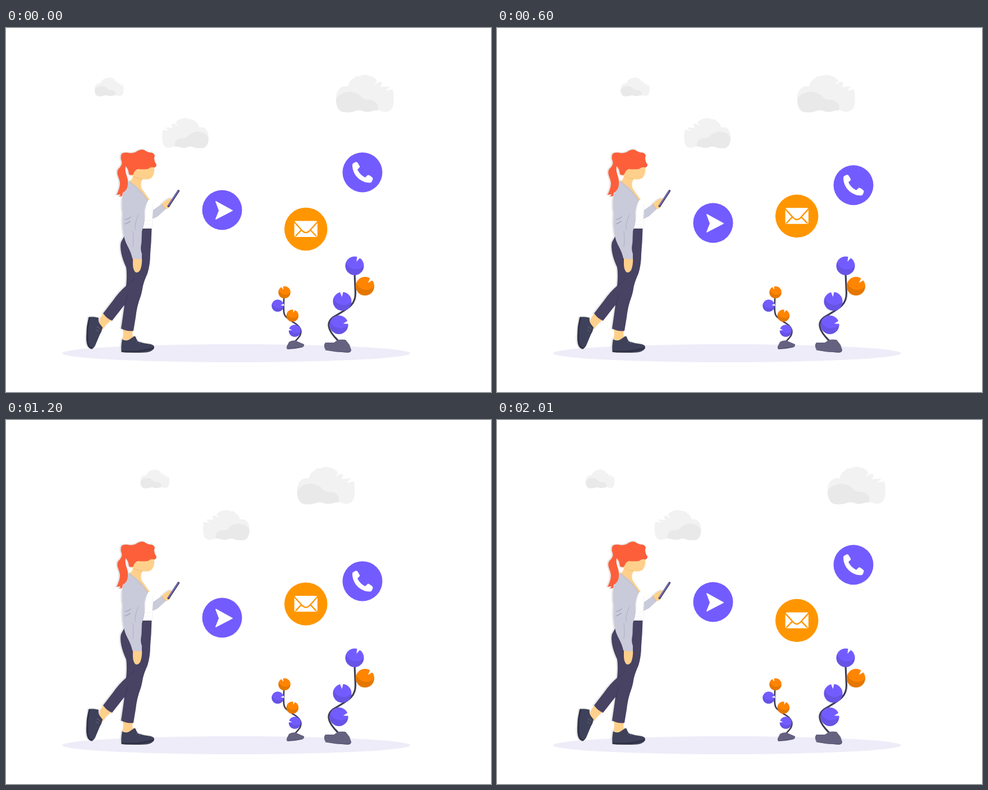
Animation of 864 by 648 pixels, one loop 2040 ms. Source, as an HTML page with a canvas:

```html
<!DOCTYPE html>
<html lang="en">
<head>
<meta charset="utf-8">
<title>Walking with a phone</title>
<style>
html, body { margin: 0; width: 100%; height: 100%; overflow: hidden; background: #fff; }
canvas { display: block; }
</style>
</head>
<body>
<canvas id="stage" width="864" height="648"></canvas>
<script>
const ctx = document.getElementById('stage').getContext('2d');
const LOOP = 2040, TURN = 990, STEP = 30;
const C = {
  purple: '#735cff', orange: '#ff9600', leaf: '#ff8500', hair: '#fd5f3a',
  skin: '#ffd08c', coat: '#c9cada', pants: '#484263', shoe: '#3e4159',
  sole: '#303247', stem: '#3f3d56', rock: '#656280', ground: '#edecf8',
  edge: '#e6e6e6'
};

const shape = d => new Path2D(d);
function fill(path, color) {
  ctx.fillStyle = color;
  ctx.fill(path);
}
function line(path, color, width) {
  ctx.strokeStyle = color;
  ctx.lineWidth = width;
  ctx.stroke(path);
}
function at(x, y, sx, sy, draw) {
  ctx.save();
  ctx.translate(x, y);
  ctx.scale(sx, sy);
  draw();
  ctx.restore();
}
function disc(x, y, r, color) {
  ctx.beginPath();
  ctx.arc(x, y, r, 0, 7);
  ctx.fillStyle = color;
  ctx.fill();
}

// Out from a to b until TURN, then linearly to c, reached at end.
function swing(t, a, b, c = a, end = LOOP) {
  if (t < TURN) return a + (b - a) * t / TURN;
  return b + (c - b) * Math.min(1, (t - TURN) / (end - TURN));
}

const cloudBody = shape('M0 44Q0 32 5 26Q12 19 21 21Q23 11 31 7Q35 2 41 3Q51-2 59 2Q68 3 73 11L67 19L76 13Q82 12 82 16L79 22L96 21L88 29L101 26Q104 39 102 53C100 65 91 68 81 65Q74 61 68 64Q59 67 51 66Q43 62 36 64Q27 68 17 67C6 68 0 58 0 44Z');
const cloudShade = shape('M0 44C5 34 18 29 29 31Q41 33 47 42Q54 46 61 45C71 46 77 55 74 64Q70 63 67 64Q59 67 51 66Q43 62 36 64Q27 68 17 67C6 68 0 58 0 44Z');

function cloud(x, y, size, flip) {
  at(flip ? x + 103 * size : x, y, flip ? -size : size, size, () => {
    fill(cloudBody, '#f2f2f2');
    fill(cloudShade, '#e9e9e9');
  });
}

const arrow = shape('M-11-15L18 1L-11 16L-5 1Z');
const handset = shape('M-18-13Q-18-16-15-17L-12-18.5Q-10-19-8.5-17L-5-11Q-4-9-6-8L-9-5Q-4 5 5 9L8 6Q10 4 12 5L17 8.5Q19 10 18.5 12L17 16Q16 18.5 13 18.5C-3 18.5-18 5-18-13Z');
const flap = shape('M-20-12L-6 3.5Q0 9 6 3.5L20-12M-18 12L-8 1.5M18 12L8 1.5');

function icons(t) {
  at(385, swing(t, 324, 362, 324, 1790), 1, 1, () => {
    disc(0, 0, 35.5, C.purple);
    fill(arrow, '#fff');
    line(arrow, '#fff', 1.8);
  });
  at(635, swing(t, 257, 294.5, 256.6), 1, 1, () => {
    disc(0, 0, 35.5, C.purple);
    fill(handset, '#fff');
  });
  at(534.2, swing(t, 358, 319.8), 1, 1, () => {
    disc(0, 0, 38.3, C.orange);
    ctx.beginPath();
    ctx.roundRect(-20.6, -14.5, 41.2, 28.4, 3);
    ctx.fillStyle = '#fff';
    ctx.fill();
    line(flap, C.orange, 2.4);
  });
}

function ball(x, y, r, color, turn) {
  disc(x, y, r, color);
  ctx.save();
  ctx.beginPath();
  ctx.arc(x, y, r, 0, 7);
  ctx.clip();
  ctx.beginPath();
  ctx.rect(x - r, y - r, 2 * r, 2 * r);
  ctx.arc(x + r * .15, y - r * .75, r * 1.14, 0, 7);
  ctx.fillStyle = 'rgba(0,0,0,.1)';
  ctx.fill('evenodd');
  ctx.restore();
  const a = turn * Math.PI / 180;
  const rim = (k, off) => [x + r * k * Math.cos(a + off), y + r * k * Math.sin(a + off)];
  ctx.beginPath();
  ctx.moveTo(...rim(.48, 0));
  ctx.lineTo(...rim(1.06, -.17));
  ctx.lineTo(...rim(1.06, .17));
  ctx.fillStyle = '#fff';
  ctx.fill();
}

const tallStem = shape('M591 556C572 537 569 523 586 513C607 500 623 494 622.5 472L621 437');
const tallRock = shape('M569 560L584 560L592 555Q598 554 605 555L612 564L615 573Q615 578 608 578L588 576L570 573Q566 570 567 563Z');
const lowStem = shape('M514 559C521 551 527 547 525 537C522 526 505 523 497 512C493 506 495 495 495 480');
const lowRock = shape('M504 559Q510 555 517 557L531 563Q532 568 526 569L515 571L502 572Q499 571 500 567Z');

function plants() {
  line(lowStem, C.stem, 2.6);
  line(tallStem, C.stem, 3.2);
  fill(lowRock, C.rock);
  fill(tallRock, C.rock);
  line(shape('M569 573L588 576L608 577Q614 577 614 573M502 571L526 568'), '#55526f', 1.2);
  ball(496, 470.5, 10.8, C.leaf, -112);
  ball(484, 494.3, 10.8, C.purple, -8);
  ball(510.3, 512, 10.8, C.leaf, -74);
  ball(514.5, 539, 10.8, C.purple, -168);
  ball(621, 423.3, 16.6, C.purple, -65);
  ball(639.5, 459.7, 16.6, C.leaf, -48);
  ball(599, 486.7, 16.6, C.purple, -94);
  ball(593, 528.3, 16.6, C.purple, -15);
}

const body = {
  rearShoe: shape('M147 515Q156 513 165 516Q164 523 168 528L172 533Q171 540 167 546L159 565Q156 571 152 571Q146 570 144 562Q142 553 144 541Z'),
  rearAnkle: shape('M173 508L188 520Q179 527 172 537Q165 532 166 519Z'),
  frontAnkle: shape('M208 537L226 539Q224 546 227 553L217 558L207 553Q210 546 208 537Z'),
  frontShoe: shape('M207 554Q213 558 219 555L228 549Q231 548 232 553L235 558Q246 562 258 563Q265 565 264 569Q262 575 253 577Q239 579 206 577Q204 569 207 554Z'),
  pants: shape('M211 370Q226 356 244 357L259.5 357Q259 380 257 402Q257 421 252 437Q246 450 243.5 461Q242 472 239 480Q233 496 231 515L227 539Q217 541 205 535Q208 515 211 493L189 521Q180 518 173 508L190 486Q201 470 214 459Q216 439 214 426C206 409 202 391 205 381Z'),
  hand: shape('M226 409L242 409Q243 421 239 431Q236 436 231 435Q226 431 226 420Z'),
  neck: shape('M226 260L244 268Q238 277 242 286L257 307L250 309L219 274Q227 269 226 260Z'),
  face: shape('M223 258L229 246L264 245Q266 260 259 267Q251 272 241 268Q230 266 223 262Z'),
  coat: shape('M220 272Q210 281 208 296Q205 317 208 331Q206 345 209 365Q211 378 217 389Q223 400 225 410Q233 413 242 411L242 402Q239 394 241 384L242 361Q248 346 246 326Q248 314 253 306Q244 292 234 283Q225 276 220 272Z'),
  sleeve: shape('M262 324L278 313Q284 316 284 323Q275 331 271 335L261 340Z'),
  palm: shape('M277 314L285 307Q292 302 295 304L296 307L291 311Q295 313 292 318Q289 322 283 322Z'),
  shirt: shape('M249 311Q256 302 260 308Q263 316 261 327Q259 336 260 345Q261 351 260 357L242 357L245 344Z'),
  hair: shape('M206 224Q210 221 217 222Q224 224 231 221Q239 215 246 217Q252 222 260 222Q267 225 264 231Q264 238 268 243Q268 249 262 248Q258 247 253 251Q243 252 235 251Q229 253 227 260Q223 264 219 260Q218 250 213 246C211 261 219 265 217 279Q216 289 208 293L207 299L202 300L204 296L197 297Q203 285 203 276C202 266 195 259 200 251Q208 244 206 237Q203 230 206 224Z')
};

const outline = ['hair', 'coat', 'pants', 'rearShoe', 'frontShoe', 'hand', 'palm'];
const soles = shape('M149 516Q144 531 145 549Q145 569 153 570M207 575.5Q237 578 262 570');

function woman() {
  ctx.save();
  ctx.translate(-1.2, -.2);
  for (const part of outline) line(body[part], C.edge, 2.6);
  ctx.restore();

  fill(body.rearAnkle, C.skin);
  fill(body.frontAnkle, C.skin);
  fill(body.rearShoe, C.shoe);
  fill(body.frontShoe, C.shoe);
  line(soles, C.sole, 3);
  line(shape('M162 532L167 535M161 537L165 540M232 560L235 557M237 562L240 559'), '#777991', .8);
  fill(body.pants, C.pants);
  line(shape('M242 361Q243 380 240 388M214 459Q224 454 229 446M211 495Q215 483 217 474'), '#3c3754', .8);
  fill(body.hand, C.skin);
  fill(body.neck, C.skin);
  fill(body.shirt, '#fff');
  line(shape('M261 314Q263 324 260 334L261 356M250 344L257 342M247 350L256 349'), '#eeeef2', .8);
  fill(body.coat, C.coat);
  line(shape('M253 306Q248 315 247 326Q248 346 242 361L241 384'), '#b2b4c7', .7);
  line(shape('M221 274Q237 287 252 306'), '#e5b574', .8);
  line(shape('M212 341Q219 340 222 336M212 349Q218 347 221 344'), '#9d9fb1', 1.2);
  line(shape('M236 333Q229 346 230 359M226 362Q228 377 226 389'), '#afb1c4', 1);
  fill(body.sleeve, C.coat);
  fill(body.palm, C.skin);
  line(shape('M278 314Q280 319 284 322'), '#a9a2c7', .8);
  line(shape('M289.5 317L307.2 290'), C.stem, 4);
  line(shape('M289.6 316L306.8 289.8'), '#8176d8', 1.6);
  fill(body.face, C.skin);
  line(shape('M228 265Q237 269 244 269'), '#e9b875', .8);
  fill(body.hair, C.hair);
}

function draw(t) {
  ctx.fillStyle = '#fff';
  ctx.fillRect(0, 0, 864, 648);
  ctx.lineCap = ctx.lineJoin = 'round';
  ctx.beginPath();
  ctx.ellipse(410, 579, 310, 16, 0, 0, 7);
  ctx.fillStyle = C.ground;
  ctx.fill();
  cloud(swing(t, 158, 260.8, 158, 2010), 88, .5, false);
  cloud(swing(t, 278, 369, 277.9), 160, .805, true);
  cloud(swing(t, 588, 500.3, 591.6), 83, 1, false);
  woman();
  plants();
  icons(t);
}

const start = performance.now();
function tick() {
  const t = (performance.now() - start) % LOOP;
  draw(Math.floor(t / STEP) * STEP);
  requestAnimationFrame(tick);
}
tick();
</script>
</body>
</html>
```
